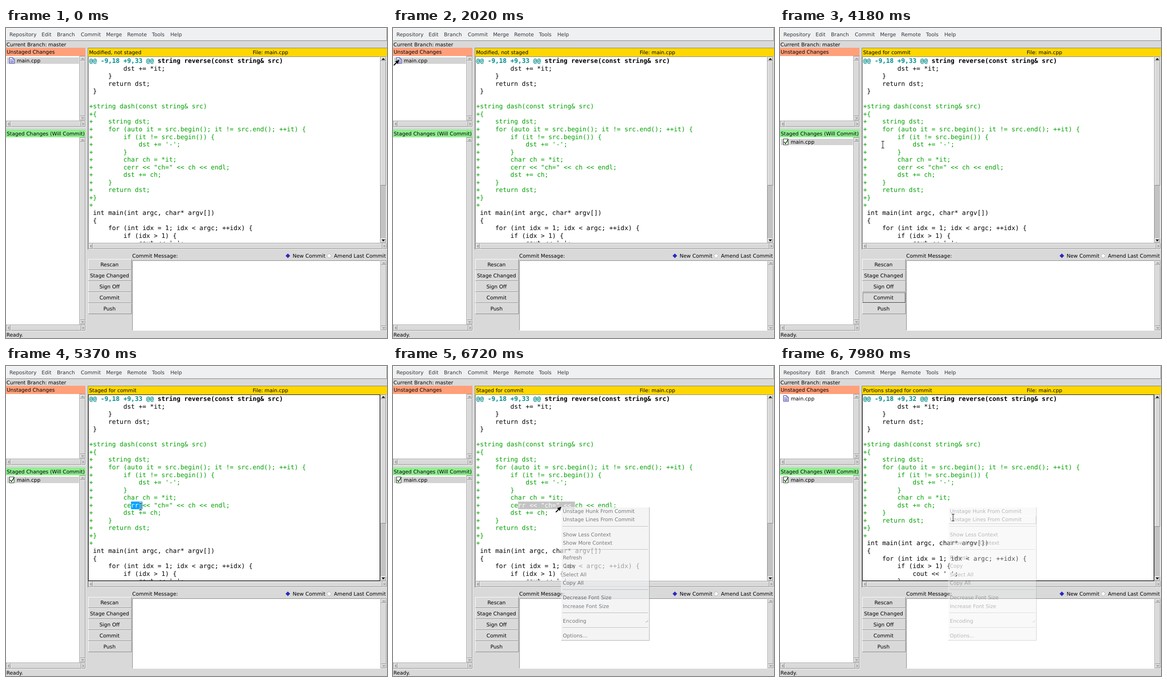
Recreate the animation shown at these times as an HTML page. Size 830 by 675 pixels, loop 8000 ms.

```html
<!DOCTYPE html>
<html lang="en">
<head>
<meta charset="utf-8">
<title>Staging lines</title>
<style>
  html, body { margin: 0; width: 100%; height: 100%; overflow: hidden; background: #d9d9d9; }
  svg { display: block; width: 830px; height: 675px; }
  text { font: 11.1px "DejaVu Sans", sans-serif; white-space: pre; text-rendering: geometricPrecision; }
  .code { font: 13.75px "DejaVu Sans Mono", monospace; }
  .bold { font-weight: bold; }
</style>
</head>
<body>
<svg id="stage" viewBox="0 0 830 675" xmlns="http://www.w3.org/2000/svg">
  <defs><clipPath id="view"><rect x="180" y="63" width="635" height="403.5"/></clipPath></defs>
  <g id="base"></g>
  <g id="scene"></g>
  <g id="menu"></g>
  <g id="cursor"></g>
</svg>
<script>
const LOOP = 8000, CODE_X = 181.3, CHAR_W = 8.278, LINE_H = 16.55;
const GREEN = '#00a000', DARK = '#828282', FACE = '#d9d9d9', PANEL = '#eff0f1', INK = '#31363b';
const $ = id => document.getElementById(id);
const esc = s => s.replace(/&/g, '&amp;').replace(/</g, '&lt;');

const rect = (x, y, w, h, fill, extra = '') =>
  `<rect x="${x}" y="${y}" width="${w}" height="${h}" fill="${fill}" ${extra}/>`;
const text = (x, y, s, fill = '#000', extra = '') =>
  `<text x="${x}" y="${y}" fill="${fill}" ${extra}>${esc(s)}</text>`;
const path = (d, fill, extra = '') => `<path d="${d}" fill="${fill}" ${extra}/>`;
const edge = (x, y, w, h, light, dark) =>
  path(`M${x + .5} ${y + h - .5}V${y + .5}H${x + w - .5}`, 'none', `stroke="${light}"`) +
  path(`M${x + .5} ${y + h - .5}H${x + w - .5}V${y + .5}`, 'none', `stroke="${dark}"`);
const raised = (x, y, w, h, fill = FACE) => rect(x, y, w, h, fill) + edge(x, y, w, h, '#fff', DARK);
const sunken = (x, y, w, h, fill) => rect(x, y, w, h, fill) + edge(x, y, w, h, DARK, '#fff');

// A scrollbar; thumbEnd is given only when there is something to scroll.
function scrollV(x, y, h, thumbEnd) {
  const fill = thumbEnd ? '#000' : '#a3a3a3', cx = x + 7, end = y + h;
  return sunken(x, y, 14, h, '#c3c3c3') +
    raised(x + 1, y + 1, 12, 9) + raised(x + 1, end - 10, 12, 9) +
    raised(x + 1, y + 10, 12, (thumbEnd || end - 10) - y - 10) +
    path(`M${cx - 4} ${y + 7.5}h8l-4-4z`, fill) + path(`M${cx - 4} ${end - 7.5}h8l-4 4z`, fill);
}
function scrollH(x, y, w) {
  const end = x + w, cy = y + 7, fill = '#a3a3a3';
  return sunken(x, y, w, 14, '#c3c3c3') +
    raised(x + 1, y + 1, 9, 12) + raised(end - 10, y + 1, 9, 12) +
    raised(x + 10, y + 1, w - 20, 12) +
    path(`M${x + 7.5} ${cy - 4}v8l-4-4z`, fill) + path(`M${end - 7.5} ${cy - 4}v8l4-4z`, fill);
}
const diamond = (x, y, fill, line) =>
  path(`M${x - 5} ${y}l5-5 5 5-5 5z`, fill, `stroke="${line}" stroke-width=".8"`);

function drawBase() {
  const menus = [['Repository', 7.5], ['Edit', 77.5], ['Branch', 111], ['Commit', 163],
    ['Merge', 218], ['Remote', 264], ['Tools', 318], ['Help', 358]];
  const buttons = ['Rescan', 'Stage Changed', 'Sign Off', 'Commit', 'Push'];
  return rect(0, 0, 830, 675, FACE) + raised(0, 0, 830, 28, PANEL) +
    menus.map(([s, x]) => text(x, 18, s, INK)).join('') +
    text(1, 39.5, 'Current Branch:') + text(92, 39.5, 'master') +
    rect(0, 43, 173, 18, '#ffa07a') + text(1.5, 56, 'Unstaged Changes') +
    rect(0, 61, 160, 141, '#fff') + scrollV(160, 61, 141) + scrollH(0, 202, 174) +
    rect(0, 221, 173, 17, '#90ee90') + text(1.5, 233.5, 'Staged Changes (Will Commit)') +
    rect(0, 238, 160, 408, '#fff') + scrollV(160, 238, 408) + scrollH(0, 646, 174) +
    rect(179, 43, 651, 1, DARK) + rect(178, 43, 1, 439, DARK) + rect(179, 44, 651, 18, '#ffd700') +
    scrollH(179, 468, 651) +
    text(275, 500, 'Commit Message:') + diamond(614, 496, '#2828c8', '#8888a0') +
    text(624.5, 500, 'New Commit') + diamond(704, 496, '#fff', '#a3a3a3') +
    text(714.5, 500, 'Amend Last Commit') +
    buttons.map((s, i) => raised(179, 503 + 24 * i, 95, 24) +
      text(225.5, 519 + 24 * i, s, '#000', 'text-anchor="middle"')).join('') +
    sunken(275, 506, 541, 153, '#fff') + scrollV(816, 506, 153) +
    text(1, 671.5, 'Ready.');
}

const SOURCE = [
  '         dst += *it;', '     }', '     return dst;', ' }', '',
  '+string dash(const string& src)', '+{', '+    string dst;',
  '+    for (auto it = src.begin(); it != src.end(); ++it) {',
  '+        if (it != src.begin()) {', "+            dst += '-';", '+        }',
  '+        char ch = *it;', '+        cerr << "ch=" << ch << endl;', '+        dst += ch;',
  '+    }', '+    return dst;', '+}', '+',
  ' int main(int argc, char* argv[])', ' {',
  '     for (int idx = 1; idx < argc; ++idx) {', '         if (idx > 1) {',
  "             cout << ' ';", '         }'];
const DEBUG_LINE = 13, SEL_START = 11, SEL_END = 26;

const codeText = (col, row, s, fill, bold = '') =>
  text(CODE_X + col * CHAR_W, 76 + row * LINE_H, s, fill, `class="code ${bold}"`);

function drawDiff(lineCount, lines, selEnd, focused) {
  const hunk = `@@ -9,18 +9,${lineCount} @@`;
  let out = codeText(0, 0, hunk, '#008b8b', 'bold') +
    codeText(hunk.length + 1, 0, 'string reverse(const string& src)', '#000', 'bold');
  lines.forEach((s, i) => {
    const col = s.search(/\S/);
    if (col < 0) return;
    if (col > 0) { out += codeText(col, i + 1, s.slice(col), '#000'); return; }
    const body = s.slice(1).search(/\S/) + 1;
    out += codeText(0, i + 1, '+', GREEN);
    if (body) out += codeText(body, i + 1, s.slice(body), GREEN);
  });
  if (selEnd > SEL_START) {
    const row = DEBUG_LINE + 1;
    out += rect(CODE_X + SEL_START * CHAR_W, 63.5 + row * LINE_H,
        (selEnd - SEL_START) * CHAR_W, LINE_H, focused ? '#00a4ff' : '#c3c3c3') +
      codeText(SEL_START, row, lines[DEBUG_LINE].slice(SEL_START, selEnd), '#fff');
  }
  return `<g clip-path="url(#view)">${out}</g>`;
}

function fileRow(y, staged, selected) {
  const icon = staged
    ? path(`M7.5 ${y + .5}h10v13h-10z`, '#fff', 'stroke="#222"') +
      path(`M9 ${y + 7}l3 4 6-10`, 'none', 'stroke="#005000" stroke-width="1.6"')
    : path(`M7.5 ${y + .5}h7l4 4v8.500h-11z`, '#fff', 'stroke="#28289c"') +
      path(`M14.5 ${y + .5}v4h4M9 ${y + 4.5}h4M9 ${y + 7}h8M9 ${y + 9}h8M9 ${y + 11}h8`, 'none', 'stroke="#4848b8"');
  return (selected ? rect(2, y, 157, 14, '#d3d3d3') : '') + icon + text(23.5, y + 11, 'main.cpp');
}

function drawScene({ stage, rowSelected, focused, selEnd, commitFocus }) {
  const caption = ['Modified, not staged', '', 'Staged for commit', 'Portions staged for commit'][stage];
  let out = sunken(179, 62, 636, 406, '#fff') + scrollV(815, 62, 406, [343, 0, 343, 350][stage]);
  if (caption) {
    const partial = stage === 3;
    const lines = partial ? SOURCE.filter((_, i) => i !== DEBUG_LINE) : SOURCE;
    out += text(181, 57, caption) + text(537.5, 57, 'File: main.cpp') +
      drawDiff(partial ? 32 : 33, lines, selEnd, focused);
  }
  if (focused) out += rect(179.5, 62.5, 635, 405, 'none', 'stroke="#000"');
  if (commitFocus) out += rect(180.5, 576.5, 92, 21, 'none', 'stroke="#000" stroke-dasharray="1 1"');
  if (stage === 0 || stage === 3) out += fileRow(64, false, stage === 0);
  if (stage > 0) out += fileRow(241, true, rowSelected);
  return out;
}

function drawMenu(active) {
  const groups = [['Unstage Hunk From Commit', 'Unstage Lines From Commit'],
    ['Show Less Context', 'Show More Context'], ['Refresh', 'Copy', 'Select All', 'Copy All'],
    ['Decrease Font Size', 'Increase Font Size'], ['Encoding'], ['Options...']];
  let y = 316, out = raised(366, 307, 193, 291, PANEL);
  if (active >= 0) out += raised(367, 307.5 + 18.4 * active, 191, 18, PANEL);
  groups.forEach((group, g) => {
    if (g) {
      out += rect(369, y - 4, 187, 1, DARK) + rect(369, y - 3, 187, 1, '#fff');
      y += 13.7;
    }
    for (const s of group) {
      out += text(370, y + 4, s, INK);
      if (s === 'Encoding') out += path(`M550 ${y + 3}l5-1.500v-3`, 'none', `stroke="${DARK}"`);
      y += 18.4;
    }
  });
  return out;
}

const OUTLINE = 'stroke="#fff" stroke-width="1.4" paint-order="stroke"';
const CURSORS = {
  arrow: path('M0 0L-10 3.500-7 5.500-13 11.500-11.500 13-5.500 7-3.500 10z', '#000', OUTLINE),
  pointer: path('M0 0V15L3.500 12 6.500 18 9.500 16.500 7.500 11.500 11 11z', '#444', OUTLINE),
  beam: path('M-3-8h6M-3 8h6M0-8V8', 'none', 'stroke="#fff" stroke-width="3"') +
    path('M-3-7.500h2.500l.5 1 .5-1H3M-3 7.500h2.500l.5-1 .5 1H3M0-7V7', 'none', 'stroke="#000"')
};

// [start, end, x, y]: the pointer travels to x, y between start and end.
const MOVES = [[1030, 1030, 177, 91], [1030, 1070, 143, 76], [1290, 2020, 14, 69],
  [2900, 3100, 54, 236], [3370, 3450, 64, 244], [4060, 4180, 224, 254], [4180, 4900, 274.5, 307],
  [4940, 5000, 274.5, 305.5], [5330, 5820, 391.5, 306], [6170, 6370, 367, 306],
  [7040, 7430, 377, 329], [7430, 7630, 377, 330]];

function pointerAt(t) {
  let x = 0, y = 0;
  for (const [start, end, tx, ty] of MOVES) {
    if (t < start) break;
    const p = end > start ? Math.min(1, (t - start) / (end - start)) : 1;
    const k = p * (2 - p);
    x += (tx - x) * k;
    y += (ty - y) * k;
  }
  return { x, y };
}

function cursorKind({ x, y }, menuOpen) {
  if (menuOpen) return 'arrow';
  if (x > 179 && y > 62) return 'beam';
  return x < 160 && ((y > 61 && y < 202) || y > 238) ? 'arrow' : 'pointer';
}

function menuOpacity(t) {
  if (t < 6590) return 0;
  if (t < 7840) return Math.min(1, (Math.floor((t - 6590) / 42) + 1) / 6);
  return t < 7890 ? .85 : t < 7930 ? .7 : t < 7980 ? .52 : .35;
}

const cache = {};
function fill(id, key, draw) {
  if (cache[id] === key) return;
  cache[id] = key;
  $(id).innerHTML = draw();
}

function render(t) {
  const pos = pointerAt(t);
  const stage = t < 2620 ? 0 : t < 3800 ? 1 : t < 7930 ? 2 : 3;
  const dragCol = Math.floor((pos.x - CODE_X) / CHAR_W + .7);
  const state = {
    stage,
    rowSelected: t >= 3760,
    focused: (t >= 5330 && t < 6590) || t >= 7840,
    selEnd: t < 5330 || stage === 3 ? 0 : t < 5820 ? Math.min(dragCol, SEL_END) : SEL_END,
    commitFocus: t >= 2620 && t < 5330
  };
  fill('scene', JSON.stringify(state), () => drawScene(state));

  const active = t < 7040 || pos.y < 308 ? -1 : pos.y < 326 ? 0 : 1;
  fill('menu', active, () => drawMenu(active));
  $('menu').setAttribute('opacity', menuOpacity(t));

  const kind = t < 1030 ? '' : cursorKind(pos, t >= 6590 && t < 7930);
  fill('cursor', kind, () => CURSORS[kind] || '');
  $('cursor').setAttribute('transform', `translate(${Math.round(pos.x)} ${Math.round(pos.y)})`);
}

$('base').innerHTML = drawBase();
const began = performance.now();
function tick() {
  render((performance.now() - began) % LOOP);
  requestAnimationFrame(tick);
}
tick();
</script>
</body>
</html>
```
